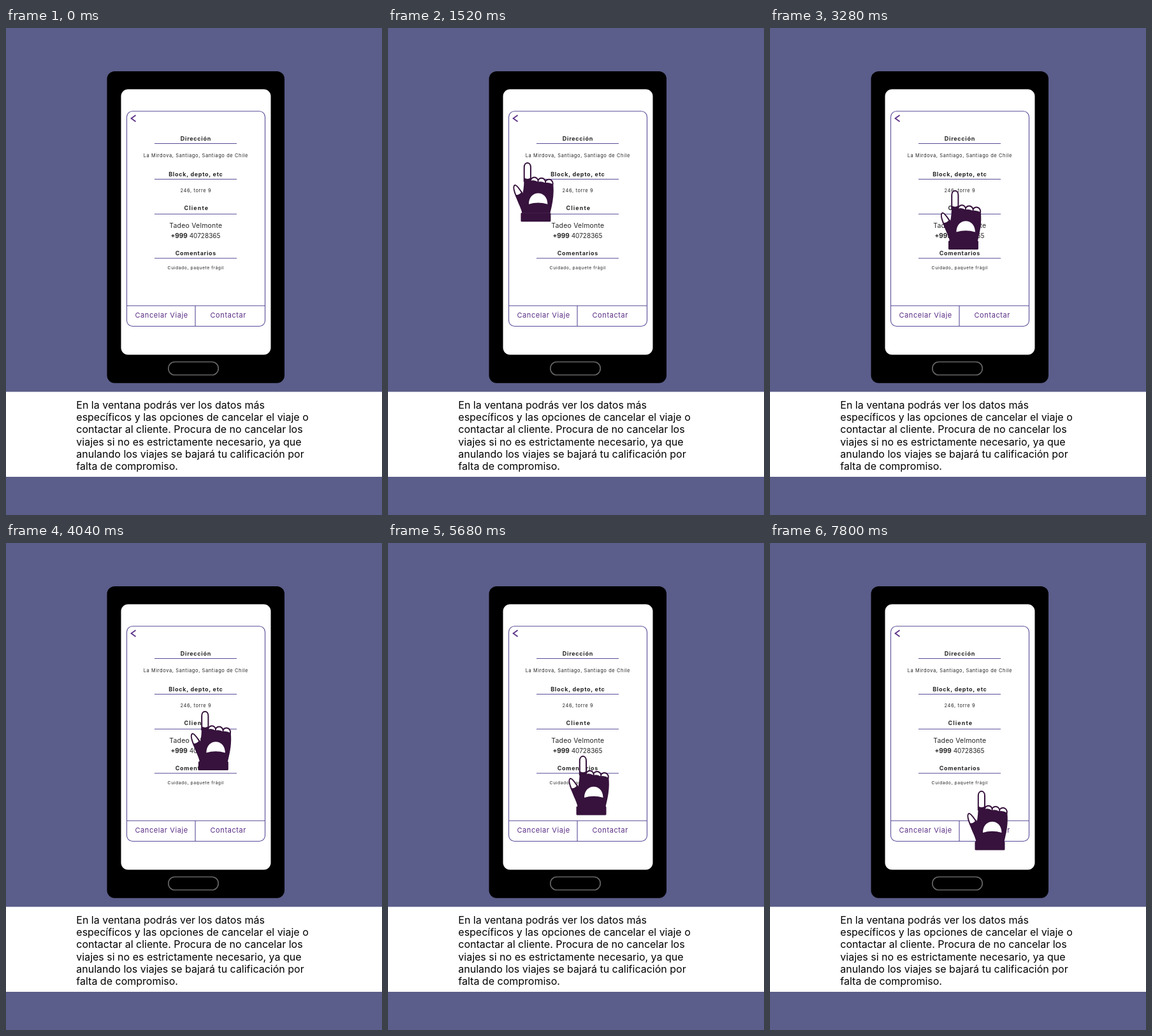
Animation of 590x765 px, one loop 8000 ms. Source, as an HTML page:

```html
<!DOCTYPE html>
<html lang="es">
<head>
<meta charset="utf-8">
<title>Detalle del viaje</title>
<style>
  html, body { margin: 0; width: 100%; height: 100%; overflow: hidden; background: #5b5d8a; }
  svg { display: block; width: 590px; height: 765px; }
  text { font-family: Inter, "Open Sans", sans-serif; fill: #262626; }
  .card text { text-anchor: middle; }
  .card .title { font-size: 9px; font-weight: 700; letter-spacing: .7px; }
  .card .note { font-size: 7.5px; letter-spacing: .6px; }
  .card .small { font-size: 6.8px; letter-spacing: .57px; }
  .card .name { font-size: 10.5px; letter-spacing: .2px; }
  .card .phone { font-size: 10px; }
  .card .action { font-size: 11px; letter-spacing: .6px; fill: #582c83; }
  .caption text { font-size: 16px; fill: #000; }
  .lines { fill: none; stroke: #5a4c98; stroke-width: 1.1; }
  .ink { fill: #36123c; }
  .outline { fill: #fff; stroke: #36123c; stroke-width: 2; }
</style>
</head>
<body>
<svg viewBox="0 0 590 765">
  <rect width="590" height="765" fill="#5b5d8a"/>
  <rect x="158.5" y="68" width="278.5" height="489.7" rx="12"/>
  <rect x="180.5" y="96.3" width="235" height="417" rx="11" fill="#fff"/>
  <rect x="254.8" y="524.5" width="78.4" height="20.5" rx="10" fill="none" stroke="#666" stroke-width="1.7"/>

  <g class="lines">
    <rect x="189.5" y="130.8" width="217" height="337.7" rx="9"/>
    <path d="M233 181.5H362M233 237.5H362M233 292.3H362M233 361.8H362M189.5 436.3H406.5M297 436.3V468.5"/>
    <path d="M203.5 137L196.5 142L203.5 147" stroke="#582c83" stroke-width="1.7"/>
  </g>

  <g class="card">
    <text class="title" x="297.9" y="176.6">Dirección</text>
    <text class="note" x="297.8" y="202.7">La Mirdova, Santiago, Santiago de Chile</text>
    <text class="title" x="297.9" y="232.6">Block, depto, etc</text>
    <text class="note" x="297.9" y="257.6">246, torre 9</text>
    <text class="title" x="298.8" y="286.3" style="letter-spacing:1.1px">Cliente</text>
    <text class="name" x="297.8" y="313.9">Tadeo Velmonte</text>
    <text class="phone" x="297.5" y="329.9"><tspan font-weight="700">+999</tspan> 40728365</text>
    <text class="title" x="297.9" y="356.9">Comentarios</text>
    <text class="small" x="297.8" y="379.2">Cuidado, paquete frágil</text>
    <text class="action" x="244.1" y="455.4">Cancelar Viaje</text>
    <text class="action" x="348.8" y="455.4">Contactar</text>
  </g>

  <rect y="571.5" width="590" height="133.5" fill="#fff"/>
  <g class="caption">
    <text x="110.3" y="598">En la ventana podrás ver los datos más</text>
    <text x="110.3" y="617.2">específicos y las opciones de cancelar el viaje o</text>
    <text x="110.3" y="636.4">contactar al cliente. Procura de no cancelar los</text>
    <text x="110.3" y="655.6">viajes si no es estrictamente necesario, ya que</text>
    <text x="110.3" y="674.8">anulando los viajes se bajará tu calificación por</text>
    <text x="110.3" y="694">falta de compromiso.</text>
  </g>

  <g id="hand" transform="translate(-70 384)">
    <g class="outline">
      <path d="M17.3 30V8C17.3-1.2 27.5-1.2 27.5 8V30Z"/>
      <path d="M15 50C10 42 5 35 2.5 36C-1 38 2 47 5 54L9 62Z"/>
      <ellipse cx="56" cy="33.5" rx="6.3" ry="6.5"/>
      <ellipse cx="44.5" cy="31.5" rx="6.3" ry="6.5"/>
      <ellipse cx="33.2" cy="30" rx="6" ry="6.3"/>
    </g>
    <path class="ink" d="M17.2 24.5Q22.5 28 27.5 24.5V29Q33 27 39 31Q44 29 50 32.5Q56 31 62.8 35C64.5 50 62 64 58 80H14C12 70 5 60 4 51Q9 52.5 14 46L15 49Q17 40 17.2 24.5Z"/>
    <rect class="ink" x="12" y="79.5" width="47" height="14" rx="1.5"/>
    <path fill="#fff" d="M24.5 66C24.5 43 54 43 54 66Q39 61.5 24.5 66Z"/>
  </g>
</svg>
<script>
  const LOOP = 8000, STEP = 40;
  const hand = document.getElementById('hand');

  // Each move: start time, end time, then two points (line) or four (cubic curve).
  const moves = [
    [160, 1840, [-66, 384], [158.4, 265], [153.4, 199], [236.5, 208]],
    [1840, 2360, [236.5, 208], [339.5, 204.5]],
    [2640, 3400, [339.5, 204.5], [254.5, 264]],
    [3640, 4160, [254.5, 264], [300.5, 263.5]],
    [4400, 5000, [300.5, 263.5], [239.5, 334]],
    [5240, 5920, [239.5, 334], [307.5, 334]],
    [6200, 6960, [307.5, 334], [239.5, 389]],
    [7200, 7800, [239.5, 389], [309.5, 389]]
  ];

  const mix = (a, b, p) => a.map((v, i) => v + (b[i] - v) * p);

  // De Casteljau: blend neighbours until one point is left.
  function along(points, p) {
    while (points.length > 1) points = points.slice(1).map((b, i) => mix(points[i], b, p));
    return points[0];
  }

  function draw(now) {
    const t = Math.floor(now % LOOP / STEP) * STEP;
    const [start, end, ...points] = moves.filter(m => m[0] <= t).pop() || moves[0];
    const p = Math.min(1, Math.max(0, (t - start) / (end - start)));
    const [x, y] = along(points, p);
    hand.setAttribute('transform', `translate(${x.toFixed(2)} ${y.toFixed(2)})`);
  }

  let origin;
  function tick(now) {
    origin ??= now;
    draw(now - origin);
    requestAnimationFrame(tick);
  }
  requestAnimationFrame(tick);
</script>
</body>
</html>
```
